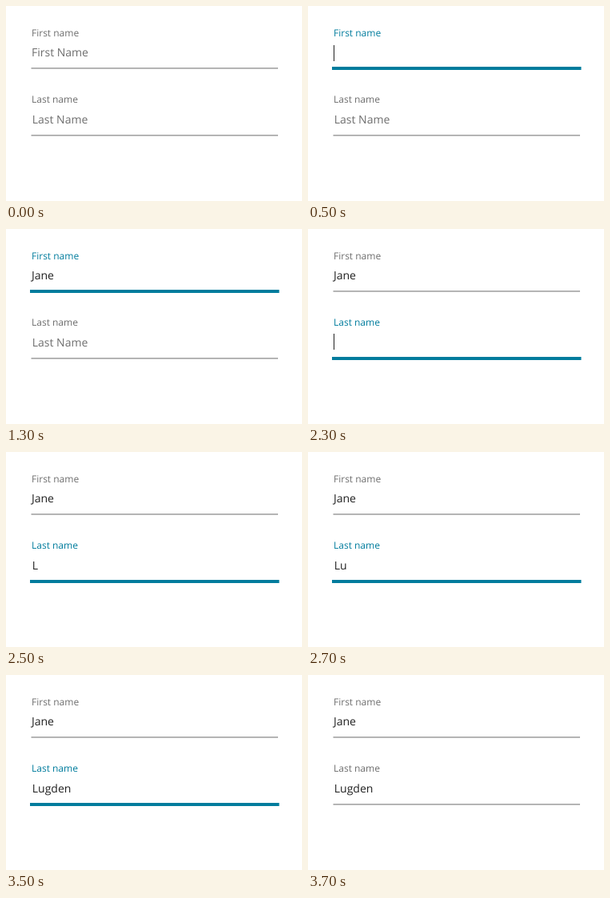
Write an HTML page that moves like this. It is 370x244 px and loops after 5.7 s.

```html
<!DOCTYPE html>
<html lang="en">
<head>
<meta charset="utf-8">
<title>Name form</title>
<style>
  html, body { margin: 0; width: 100%; height: 100%; overflow: hidden; background: #fff; }
  svg { display: block; width: 370px; height: 244px; }
  text { font-family: "Open Sans", sans-serif; text-rendering: geometricPrecision; fill: #6e6e6e; }
  .label { font-size: 12px; }
  .value { font-size: 14px; }
  .line { fill: #aaa; }
  .caret { fill: #222; }
  .filled .value { fill: #222; }
  .focused .label, .focused .line { fill: #007c9d; }
</style>
</head>
<body>
<svg id="stage" viewBox="0 0 370 244"></svg>
<script>
const LOOP = 5700;
const KEY_DELAY = 200;
const stage = document.getElementById("stage");

const fields = [
  { label: "First name", hint: "First Name", entry: "Jane", x: 32, y: 0, focus: 500, blur: 2300 },
  { label: "Last name", hint: "Last Name", entry: "Lugden", x: 32.8, y: 84, focus: 2300, blur: 3700 },
];

function add(parent, tag, attributes, content = "") {
  const node = document.createElementNS("http://www.w3.org/2000/svg", tag);
  for (const name in attributes) node.setAttribute(name, attributes[name]);
  node.textContent = content;
  return parent.appendChild(node);
}

function setRect(node, x, y, width, height) {
  Object.entries({ x, y, width, height }).forEach(([name, v]) => node.setAttribute(name, v));
}

for (const field of fields) {
  const { y } = field;
  field.group = add(stage, "g", {});
  // The second label sits one pixel closer to its input.
  add(field.group, "text", { class: "label", x: 32, y: y ? 121 : 38 }, field.label);
  field.value = add(field.group, "text", { class: "value", x: field.x, y: y + 63 });
  field.line = add(field.group, "rect", { class: "line" });
  field.caret = add(field.group, "rect", { class: "caret" });
  setRect(field.caret, 32, y ? 131 : 49, 1, 20);
}

function drawField(field, time) {
  const { y, focus, blur, entry } = field;
  const started = time >= focus;
  const focused = started && time < blur;
  const typed = Math.max(0, Math.floor((time - focus) / KEY_DELAY));

  field.group.setAttribute("class", `${started ? "filled" : ""} ${focused ? "focused" : ""}`);
  field.value.textContent = started ? entry.slice(0, typed) : field.hint;
  field.caret.setAttribute("visibility", focused && typed === 0 ? "visible" : "hidden");
  if (focused) setRect(field.line, 30, y + 76, 311.5, 4);
  else setRect(field.line, 31.5, y + 77, 308.5, 1.75);
}

function frame() {
  const time = performance.now() % LOOP;
  fields.forEach(field => drawField(field, time));
  requestAnimationFrame(frame);
}
frame();
</script>
</body>
</html>
```
